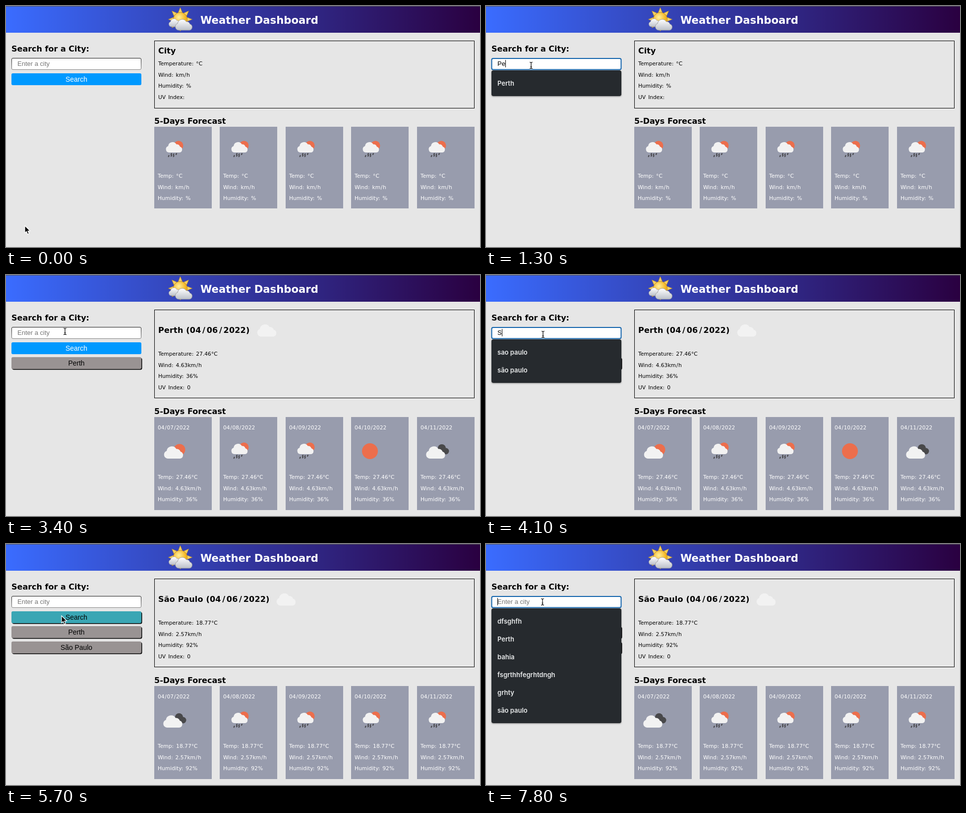
An HTML page for the animation above (8 s loop, 956 by 487 pixels).

```html
<!DOCTYPE html>
<html lang="en">
<head>
<meta charset="utf-8">
<title>Weather Dashboard</title>
<style>
  html, body { margin: 0; width: 100%; height: 100%; overflow: hidden; background: #e6e6e6; }
  svg { display: block; }
  text { font: 10.7px "DejaVu Sans", Verdana, sans-serif; word-spacing: .15em; }
  .head { font-weight: bold; font-size: 16px; word-spacing: 0; }
  .title { letter-spacing: .2px; }
  .brand { font-size: 21.2px; fill: #fff; }
  .light { fill: #fff; }
  .field { font: 13px "Liberation Sans", Arial, sans-serif; word-spacing: 0; }
  .hint { fill: #757575; }
  .button { font: 13.9px "Liberation Sans", Arial, sans-serif; word-spacing: 0; text-anchor: middle; }
  .option { font: 600 13px Inter, sans-serif; word-spacing: 0; fill: #e8eaeb; }
</style>
</head>
<body>
<svg width="956" height="487" viewBox="0 0 956 487">
  <defs>
    <linearGradient id="bar"><stop stop-color="#3a6cff"/><stop offset="1" stop-color="#2a0040"/></linearGradient>
    <radialGradient id="gold" cx=".4" cy=".35"><stop stop-color="#fff0a0"/><stop offset="1" stop-color="#f4b41e"/></radialGradient>
    <linearGradient id="silver" x2="0" y2="1"><stop stop-color="#fff"/><stop offset="1" stop-color="#bcc1ca"/></linearGradient>
    <linearGradient id="edge" x2="0" y2="1"><stop stop-color="#1c1c1c"/><stop offset="1" stop-color="#858585"/></linearGradient>
    <filter id="soft" x="-5%" y="-5%" width="110%" height="115%"><feDropShadow dx="0" dy="1" stdDeviation="1.5" flood-opacity=".4"/></filter>
    <path id="cloud" d="M8 26A8 8 0 0 1 6 10.500A10.500 10.500 0 0 1 25.500 6.500A8 8 0 0 1 34 12A7.200 7.200 0 0 1 33 26Z"/>
  </defs>
  <rect width="956" height="487" fill="#e6e6e6"/>
  <rect width="956" height="54" fill="url(#bar)"/>
  <rect width="956" height="1" fill="#55575c"/>
  <g id="logo"></g>
  <text class="head brand" x="392" y="36">Weather Dashboard</text>
  <text class="head" x="11" y="92">Search for a City:</text>
  <g id="report"></g>
  <g id="panel"></g>
  <g id="pointer"></g>
</svg>
<script>
const LOOP = 8000;
const $ = id => document.getElementById(id);
const range = n => [...Array(n).keys()];

// Dates get a little room around each slash
function text(x, y, s, cls = '') {
  const pad = cls.includes('head') ? '.16em' : '.06em';
  const dx = s.includes('/') ? `dx="${[...s].map((c, i) => c === '/' || s[i - 1] === '/' ? pad : 0).join(' ')}"` : '';
  return `<text class="${cls}" x="${x}" y="${y}" ${dx}>${s}</text>`;
}
const rect = (x, y, w, h, fill, more = '') =>
  `<rect x="${x}" y="${y}" width="${w}" height="${h}" fill="${fill}" ${more}/>`;
const circle = (x, y, r, fill) => `<circle cx="${x}" cy="${y}" r="${r}" fill="${fill}"/>`;
const cloud = (x, y, k = 1, fill = '#f2f2f2', more = '') =>
  `<use href="#cloud" transform="translate(${x} ${y}) scale(${k})" fill="${fill}" ${more}/>`;

const ORANGE = '#ec6e4c';
// Icons are centred on 0,0
const icons = {
  sun: circle(-2, 0, 16, ORANGE),
  partly: circle(11, -3, 11.5, ORANGE) + cloud(-21, -11),
  clouds: circle(10, -6, 8, '#48484a') + circle(18, 0, 6.5, '#48484a') + rect(2, -4, 17, 10, '#48484a') + cloud(-22.5, -11),
  rain: circle(9, -8, 9.5, ORANGE) + cloud(-17, -16, .85) +
    range(6).map(i => `<ellipse cx="${-6 + i % 3 * 5 - (i > 2) * 3}" cy="${9 + (i > 2) * 5 + i % 2}" rx="1.300" ry="2.300" transform="rotate(25 ${-6 + i % 3 * 5} 10)" fill="#4d4d52"/>`).join('')
};

const line = 'stroke="#9b9a98" stroke-width="1"';
$('logo').innerHTML =
  range(8).map(i => `<path d="M-4 -14L0 -24L4 -14Z" transform="translate(351.500 27) rotate(${i * 45})" fill="#f2cf63" stroke="#b98a2c" stroke-width=".7"/>`).join('') +
  '<circle cx="351.500" cy="27" r="14" fill="url(#gold)" stroke="#c9952a" stroke-width=".8"/>' +
  cloud(328, 25, .65, 'url(#silver)', line) + cloud(341, 26, .88, 'url(#silver)', line);

const history = ['dfsghfh', 'Perth', 'bahia', 'fsgrthhfegrhtdngh', 'grhty', 'são paulo'];
const blank = { title: 'City', temp: '', wind: '', hum: '', uv: '', days: Array(5).fill('rain') };
const perth = { title: 'Perth (04/06/2022)', icon: 506, temp: '27.46', wind: '4.63', hum: '36', uv: '0',
  days: ['partly', 'rain', 'rain', 'sun', 'clouds'] };
const paulo = { title: 'São Paulo (04/06/2022)', icon: 545, temp: '18.77', wind: '2.57', hum: '92', uv: '0',
  days: ['clouds', 'rain', 'rain', 'rain', 'rain'] };

// Each step changes part of the page state from its time on
const steps = [
  [0, { value: '', list: [], focus: false, filled: false, caret: 0, saved: [], city: blank }],
  [800, { focus: true, caret: 1, list: history }],
  [1000, { value: 'P', list: ['Perth'] }],
  [1200, { value: 'Pe' }],
  [1600, { value: 'Perth', filled: true, list: [], caret: 0 }],
  [1800, { focus: false }],
  [2000, { saved: ['Perth'] }],
  [2200, { city: perth, value: '', filled: false }],
  [3600, { focus: true, caret: 1, list: history }],
  [3900, { caret: 0 }],
  [4100, { caret: 1, value: 'S', list: ['sao paulo', 'são paulo'] }],
  [4200, { value: 'Sa', list: ['sao paulo'] }],
  [4300, { value: 'Sao' }],
  [4500, { caret: 0 }],
  [4800, { caret: 1 }],
  [5200, { value: 'sao paulo', filled: true, list: [], caret: 0 }],
  [5500, { focus: false, saved: ['Perth', 'São Paulo'] }],
  [5700, { city: paulo, value: '', filled: false }],
  [7000, { focus: true, caret: 1, list: history }],
  [7200, { caret: .6 }],
  [7300, { caret: .3 }],
  [7400, { caret: 0 }],
  [7700, { caret: .5 }],
  [7800, { caret: 1 }]
];

const path = [
  [0, 38, 444], [300, 62, 290], [600, 89, 122], [700, 91, 120], [1300, 91, 120], [1500, 93, 190],
  [1600, 98, 149], [3100, 98, 149], [3400, 119, 114], [3500, 119, 114], [3600, 115, 120],
  [4700, 115, 120], [5100, 113, 156], [5300, 112, 145], [6300, 112, 145], [6600, 115, 119],
  [6700, 115, 119], [6800, 114, 117], [LOOP, 114, 117]
];

function pointerAt(t) {
  const i = path.findIndex(p => p[0] > t);
  const [t0, x0, y0] = path[i - 1], [t1, x1, y1] = path[i];
  const k = (t - t0) / (t1 - t0);
  return [Math.round(x0 + (x1 - x0) * k), Math.round(y0 + (y1 - y0) * k)];
}

function report(c) {
  const full = c.icon > 0, grow = full ? 43 : 0;
  const facts = [`Temperature: ${c.temp}°C`, `Wind: ${c.wind}km/h`, `Humidity: ${c.hum}%`, `UV Index: ${c.uv}`];
  if (!full) facts[1] = 'Wind: km/h';
  const cards = c.days.map((icon, i) => {
    const x = Math.round(299 + i * 132.4), top = 244 + grow, base = full ? 412 : 347;
    const rows = [`Temp: ${c.temp}°C`, facts[1], facts[2]];
    return rect(x, top, 116, full ? 188 : 165, '#989cad') +
      (full ? text(x + 7, 312, `04/${String(7 + i).padStart(2, '0')}/2022`, 'light') : '') +
      `<g transform="translate(${x + 40} ${full ? 356 : 290})">${icons[icon]}</g>` +
      rows.map((r, j) => text(x + 7, Math.round(base + j * 22.5), r, 'light')).join('');
  });
  return rect(299.5, 70.5, 645, 136 + grow - (full ? 1 : 0), 'none', 'stroke="#000"') +
    text(307, full ? 117 : 96, c.title, full ? 'head title' : 'head') +
    (full ? cloud(c.icon, 98.5) : '') +
    facts.map((f, i) => text(307, Math.round(120 + grow + i * 22.6), f)).join('') +
    text(299, 238 + grow, '5-Days Forecast', 'head') + cards.join('');
}

const button = (y, label, fill, raised) =>
  (raised ? rect(12.5, y + 1.5, 262, 24, '#000', 'rx="3.500"') : '') +
  rect(11, y, 262, 24, fill, 'rx="3"') +
  text(142, y + 17, label, raised ? 'button' : 'button light');

const glyph = { P: .667, S: .667, e: .556, a: .556, o: .556 };

function panel(s, hover) {
  const caretX = 23.5 + 13 * [...s.value].reduce((w, c) => w + (glyph[c] || .5), 0);
  const h = 16 + 36 * s.list.length;
  return button(136, 'Search', hover ? '#3aa6b4' : '#0099ff', hover) +
    s.saved.map((n, i) => button(Math.round(166 + i * 30.6), n, '#999393', true)).join('') +
    (s.focus
      ? rect(11.5, 106, 261, 22.5, s.filled ? '#e8f0fe' : '#fff', 'rx="3" stroke="#1264ac" stroke-width="2"')
      : rect(11.5, 105.5, 261, 23, s.filled ? '#e8f0fe' : '#fff', 'rx="2.500" stroke="url(#edge)"')) +
    text(23, 121, s.value || 'Enter a city', s.value ? 'field' : 'field hint') +
    (s.caret ? rect(Math.floor(caretX), 109, 1, 15, '#000', `opacity="${s.caret}"`) : '') +
    (s.list.length ? rect(11, 130, 262, h, '#282c2e', 'rx="4" filter="url(#soft)"') : '') +
    s.list.map((n, i) => text(23, 161 + 36 * i, n, 'option')).join('');
}

const arrow = '<path d="M0 0V14.500L3.300 11.500L5.700 17L8.300 15.900L6 10.500H10.500Z" fill="#000" stroke="#fff" stroke-width="1.200"/>';
const beam = ['#fff" stroke-width="3', '#000" stroke-width="1.200'].map(ink =>
  `<path d="M-3 -6.500Q0 -6.500 0 -4.500Q0 -6.500 3 -6.500M0 -5V5M-3 6.500Q0 6.500 0 4.500Q0 6.500 3 6.500M-1.500 2.500H1.500" fill="none" stroke="${ink}"/>`).join('');

let shown;
function frame(now) {
  const t = Math.floor(now % LOOP / 100) * 100;
  if (t !== shown) {
    shown = t;
    const s = Object.assign({}, ...steps.filter(p => p[0] <= t).map(p => p[1]));
    const [x, y] = pointerAt(t);
    const hover = !s.list.length && y >= 136 && y < 160;
    $('report').innerHTML = report(s.city);
    $('panel').innerHTML = panel(s, hover);
    $('pointer').innerHTML = `<g transform="translate(${x} ${y})">${y >= 105 && y < 130 ? beam : arrow}</g>`;
  }
  requestAnimationFrame(frame);
}
const start = performance.now();
const tick = frame;
frame(0);
</script>
</body>
</html>
```
